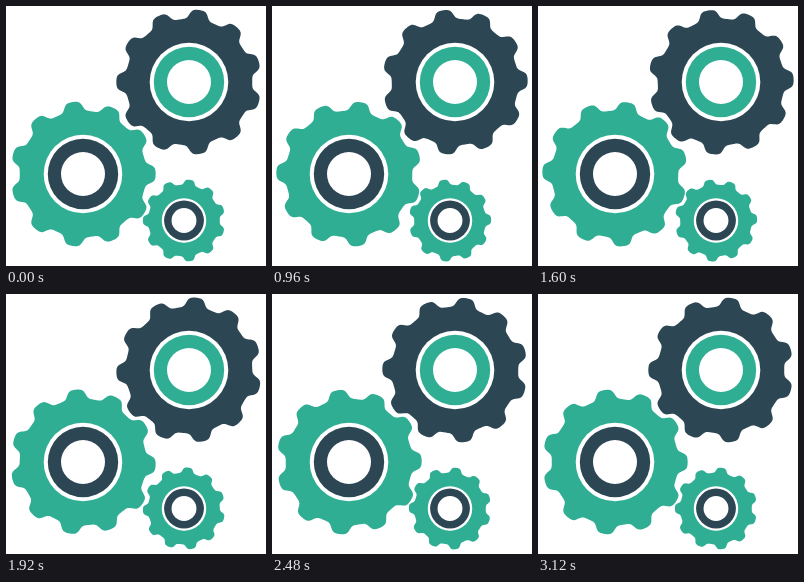
Animation of 260 by 260 pixels, one loop 3.16 s. Source, as an HTML page:

```html
<!DOCTYPE html>
<html>
<head>
<meta charset="utf-8">
<title>Gears</title>
<style>
html, body { margin: 0; width: 100%; height: 100%; overflow: hidden; background: #fff; }
svg { display: block; width: 100vw; height: 100vh; }
</style>
</head>
<body>
<svg id="stage" viewBox="0 0 260 260"></svg>
<script>
const LOOP = 3160, STEP = 40, TEETH = 11, PITCH = 360 / TEETH;
const TEETH_PER_LOOP = 5, START = PITCH / 4;
const GREEN = '#2fae94', DARK = '#2d4654';

// Rounded teeth: a flattened cosine wave around the rim, one tooth pointing up.
function rim() {
  const points = [], count = TEETH * 40;
  for (let i = 0; i < count; i++) {
    const a = i / count * 2 * Math.PI;
    const r = 68 + 4.9 * Math.tanh(2 * Math.cos(TEETH * a) - 0.15);
    points.push((r * Math.sin(a)).toFixed(2) + ' ' + (-r * Math.cos(a)).toFixed(2));
  }
  return 'M' + points.join('L') + 'Z';
}

const RIM = rim();
const gears = [
  { x: 183, y: 76, size: 1, body: DARK, ring: GREEN, dir: -1 },
  { x: 77, y: 168, size: 1, body: GREEN, ring: DARK, dir: 1 },
  { x: 178, y: 214.5, size: 0.566, body: GREEN, ring: DARK, dir: -1 }
];

const stage = document.getElementById('stage');
stage.innerHTML = gears.map(g => `
  <g transform="translate(${g.x} ${g.y}) scale(${g.size})">
    <path d="${RIM}" fill="${g.body}"/>
    <circle r="39.3" fill="#fff"/>
    <circle r="35.2" fill="${g.ring}"/>
    <circle r="22" fill="#fff"/>
  </g>`).join('');
const rims = stage.querySelectorAll('path');

// The last step of the loop shows the same pose as the first.
function draw() {
  const t = Math.floor(performance.now() % LOOP / STEP) * STEP;
  const angle = t / (LOOP - STEP) * TEETH_PER_LOOP * PITCH - START;
  gears.forEach((g, i) => rims[i].setAttribute('transform', `rotate(${g.dir * angle})`));
  requestAnimationFrame(draw);
}
draw();
</script>
</body>
</html>
```
